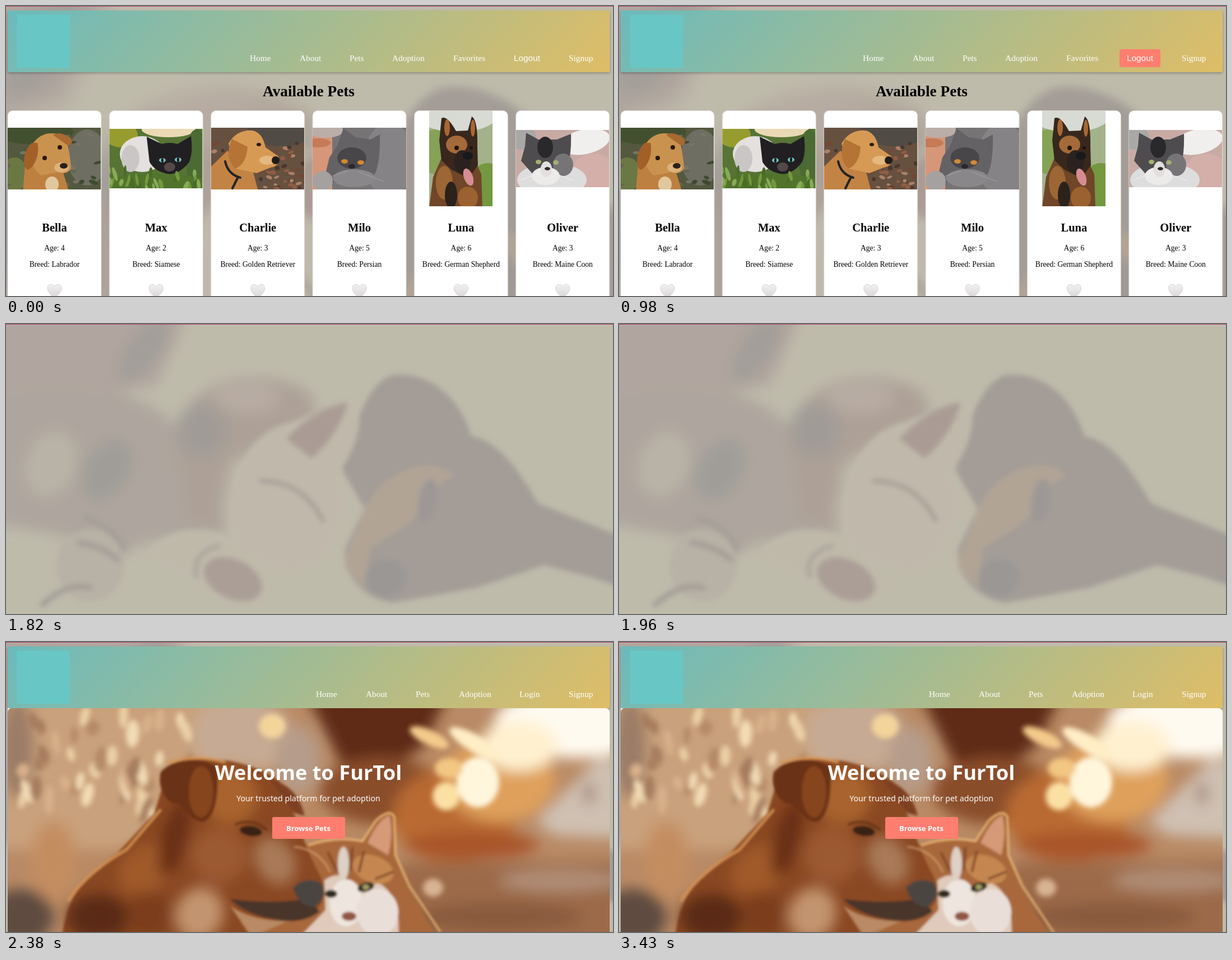
Write an HTML page that moves like this. It is 1083 by 517 pixels and loops after 3.5 s.

```html
<!DOCTYPE html>
<html lang="en">
<head>
<meta charset="utf-8">
<title>Pet adoption</title>
<style>
  html, body { margin: 0; width: 100%; height: 100%; overflow: hidden; background: #bdb8a9; }
  svg { display: block; width: 1083px; height: 517px; }
  text { font-family: "Liberation Serif", Times, serif; white-space: pre; }
  .sans { font-family: "Liberation Sans", Arial, sans-serif; }
  .hero { font-family: "Noto Sans", "Open Sans", sans-serif; fill: #fff; }
  .mid { text-anchor: middle; }
  .bold { font-weight: 700; }
  .nav { font-size: 15.35px; fill: #fff; }
</style>
</head>
<body>
<svg id="stage" viewBox="0 0 1083 517"></svg>
<script>
const LOOP = 3500, STEP = 70;
const HOVER_END = 350, BLANK_AT = 1820, HOME_AT = 2030, LOGO_AT = 2100;
const CORAL = '#ff7e70';

// Markup helpers
const E = (fill, x, y, rx, ry = rx, turn = 0) =>
  `<ellipse cx="${x}" cy="${y}" rx="${rx}" ry="${ry}" fill="${fill}" transform="rotate(${turn} ${x} ${y})"/>`;
const P = (fill, d) => `<path fill="${fill}" d="${d}"/>`;
const L = (color, width, d) => `<path fill="none" stroke="${color}" stroke-width="${width}" stroke-linecap="round" d="${d}"/>`;
const R = (fill, x, y, w, h, r = 0) => `<rect x="${x}" y="${y}" width="${w}" height="${h}" rx="${r}" fill="${fill}"/>`;
const T = (x, y, size, cls, words) => `<text x="${x}" y="${y}" font-size="${size}" class="${cls}">${words}</text>`;
const soft = (blur, body) => `<g filter="url(#b${blur})">${body}</g>`;
const clipped = (id, x, y, w, h, body, r = 0) =>
  `<clipPath id="${id}">${R('#000', x, y, w, h, r)}</clipPath><g clip-path="url(#${id})">${body}</g>`;

let seed = 7;
const rand = (a, b) => {
  seed = (seed * 16807) % 2147483647;
  return a + (b - a) * seed / 2147483647;
};
const scatter = (n, colors, x0, x1, y0, y1, rx, ry) => Array.from({ length: n }, (_, i) =>
  E(colors[i % colors.length], rand(x0, x1), rand(y0, y1), rand(rx / 2, rx), rand(ry / 2, ry), rand(-25, 25))).join('');

// Faded picture of a sleeping kitten and puppy
const backdrop = R('#bfbbab', -20, -20, 1123, 557) + soft(12,
  P('#b1a69f', 'M-30-30H330L270 110 130 130-30 140Z') +
  E('#a39e99', 245, 45, 30, 70, 35) +
  P('#aea69e', 'M-30 125C100 90 250 110 310 190L400 370 250 390 190 420 110 380-30 355Z') +
  E('#b9b2a6', 80, 250, 45, 60, 20) + E('#a09d99', 180, 260, 40, 60, 30) +
  P('#ada197', 'M300 200C320 110 420 70 520 110 570 130 560 180 500 190L400 250 380 370 320 350Z') +
  E('#a19b97', 350, 190, 45, 50) + E('#b7aca3', 430, 130, 60, 28)) + soft(5,
  P('#a39c97', 'M600 260C620 180 650 90 700 90 780 90 820 160 830 200 890 210 930 290 950 320L1100 380V470L1040 450 960 430 840 470 690 497C640 490 600 450 605 400L640 330Z') +
  P('#c0b9ab', 'M400 370C395 260 440 190 510 175L600 140C650 130 630 220 595 260L610 340 560 430C490 460 430 420 400 370Z') +
  P('#aa9c94', 'M500 205C530 170 570 145 610 140 600 180 570 220 545 240Z') +
  L('#a9a098', 9, 'M455 280C500 280 540 300 565 350') +
  P('#b1a495', 'M640 330C670 260 760 230 800 270L750 300C740 360 690 370 650 400L640 470 605 435C608 390 630 370 640 330Z') +
  E('#9b9795', 677, 452, 36, 34) + E('#9d9896', 752, 315, 16, 40, 10) +
  P('#bfb9aa', 'M250 410C290 350 400 350 450 430L465 485 400 495Z') +
  E('#aa9e96', 405, 455, 55, 35, 25) + E('#b8b1a5', 150, 430, 60, 65) +
  L('#a49e98', 10, 'M140 345Q190 360 210 400M130 390Q170 395 200 420M65 500Q110 460 150 470') +
  L('#a8a19a', 7, 'M340 450Q330 410 380 395'));

// Pet portraits: [name, age, breed, x, y, width, height, picture]
const pets = [
  ['Bella', 4, 'Labrador', 3, 217, 166, 110,
    R('#53583f', 0, 210, 175, 120) + E('#6f6e62', 145, 270, 35, 50) + E('#43502f', 50, 225, 70, 22) +
    E('#6c7843', 15, 300, 24, 30) + scatter(26, ['#64664f', '#3f4930', '#787565'], 3, 169, 217, 327, 9, 4) +
    P('#bd8041', 'M30 330L34 285Q60 265 100 290L112 330Z') +
    P('#ca924f', 'M46 248Q62 222 92 228L110 246Q116 278 116 290 108 302 94 296L62 302Q40 284 46 248Z') +
    P('#a26028', 'M46 244C30 258 28 288 39 292 55 284 60 258 56 244Z') +
    P('#a86a30', 'M84 230Q96 222 116 236 121 246 111 249L98 240Z') +
    E('#ddb27a', 99, 288, 13, 9) + E('#2b201c', 103, 285, 7, 5) + E('#2a1810', 69, 271, 4) + E('#2a1810', 96, 252, 4) +
    E('#e1c79d', 82, 318, 12, 14)],
  ['Max', 2, 'Siamese', 184.5, 219, 166, 106,
    R('#577435', 180, 215, 175, 115) + E('#979c2f', 205, 230, 30, 22) + E('#ead9b4', 290, 220, 48, 14) +
    E('#4c6a33', 340, 270, 20, 50) + E('#e4e0dd', 243, 264, 40, 32) + E('#cac6c5', 222, 272, 16, 24) +
    P('#211f22', 'M251 233L278 246Q292 242 306 246L330 232Q334 260 327 278 312 298 292 300 266 296 256 278Z') +
    E('#55484a', 292, 287, 10, 8) + E('#6fc0bd', 279, 275, 6, 4) + E('#6fc0bd', 307, 274, 6, 4) +
    E('#111', 279, 275, 2, 4) + E('#111', 307, 274, 2, 4) + E('#51732b', 267, 316, 95, 17) +
    scatter(28, ['#73993f', '#496c27', '#89aa58'], 184, 350, 292, 325, 4, 13)],
  ['Charlie', 3, 'Golden Retriever', 366, 217, 166, 110,
    R('#66503f', 360, 210, 180, 120) + E('#504b44', 490, 225, 60, 25) +
    scatter(70, ['#925d44', '#49372f', '#ac8169', '#754634'], 366, 532, 245, 327, 6, 4) +
    P('#c38344', 'M362 330V290L395 258 440 292 450 330Z') +
    P('#d69a55', 'M397 245Q412 220 440 222 458 226 463 252L486 268Q490 285 472 288L447 298 410 290Z') +
    P('#b57435', 'M403 237Q389 270 409 290 429 282 431 251Z') +
    E('#e5b97f', 466, 275, 14, 8) + E('#211b1a', 481, 275, 7) + E('#2a1912', 451, 247, 4, 3) +
    L('#222422', 4, 'M391 277Q396 300 418 306M413 307L404 325')],
  ['Milo', 5, 'Persian', 547, 217, 167, 110,
    R('#777476', 540, 210, 180, 120) + R('#d69679', 540, 210, 42, 120) + E('#bbaea8', 570, 222, 32, 13) +
    E('#c67a56', 557, 244, 22, 8) + E('#868386', 684, 274, 45, 66) +
    P('#656265', 'M591 249L602 218 624 234 650 238 667 229Q668 290 654 305 632 326 595 312L565 320 577 270Z') +
    E('#89878a', 621, 307, 38, 16) + E('#49464a', 617, 271, 26, 19) + E('#d28932', 604, 277, 6, 4) +
    E('#d28932', 633, 279, 6, 4) + E('#292529', 617, 286, 6, 4) + L('#a5a1a2', 1, 'M610 294L565 309M628 295L674 313') +
    E('#a6a1a1', 565, 312, 18, 18)],
  ['Luna', 6, 'German Shepherd', 755, 187, 113, 170,
    R('#a4b28b', 750, 180, 125, 180) + E('#d7dbd4', 805, 190, 75, 35) + E('#73983f', 860, 335, 40, 55) + E('#85a257', 765, 260, 25, 40) +
    P('#704528', 'M755 360L762 305 782 260 830 260 848 300 850 360Z') +
    P('#38271d', 'M773 240L777 200Q787 194 803 223L824 222 831 197Q842 203 841 251L842 284 825 307 795 292 777 275Z') +
    E('#a86732', 787, 217, 5, 15) + E('#a86732', 833, 218, 4, 15) + E('#a46a39', 804, 247, 19, 16) +
    E('#2b211e', 814, 278, 15, 21) + E('#17191b', 824, 267, 9, 7) + E('#20130d', 804, 253, 4) + E('#20130d', 830, 253, 3) +
    E('#d58d92', 825, 305, 8, 16, -20) + E('#9c6735', 782, 315, 15, 30) + E('#2b221c', 794, 337, 11, 24) + E('#9b6130', 824, 342, 18, 20)],
  ['Oliver', 3, 'Maine Coon', 910, 221, 166, 102,
    R('#c8aaa5', 900, 215, 180, 120) + E('#f1eeee', 1033, 242, 45, 22, -12) + E('#aaa8a7', 918, 234, 28, 22) +
    E('#d4aea9', 1048, 300, 40, 37) + E('#dedddd', 974, 310, 62, 30) +
    P('#4e4c4e', 'M926 250L928 226 950 238 983 238 1008 228Q1009 265 1002 285L975 301 941 301 919 276Z') +
    E('#777477', 994, 283, 18, 20) + E('#29282b', 962, 252, 14, 19) + E('#edeaea', 963, 303, 25, 16) + E('#e3dfde', 964, 291, 10, 14) +
    E('#a6ae73', 950, 278, 5, 4) + E('#a6ae73', 981, 279, 5, 4) + E('#332a2c', 966, 290, 5, 3) + L('#f4f2f1', 1, 'M953 297L919 310M976 297L1012 311')],
];

const card = ([name, age, breed, x, y, w, h, picture], i) => {
  const left = 3 + i * 181.35, mid = left + 83.5;
  return `<rect x="${left}" y="186.5" width="167" height="350" rx="9" fill="#fff" stroke="#d5d1cd"/>` +
    clipped('pet' + i, x, y, w, h, soft(1, picture)) +
    T(mid, 401.5, 20.5, 'mid bold', name) + T(mid, 436, 13.6, 'mid', 'Age: ' + age) + T(mid, 465.3, 13.6, 'mid', 'Breed: ' + breed) +
    `<path transform="translate(${mid} 496)" fill="url(#heart)" stroke="#cfcdcf" stroke-width=".8" d="M0 4C-4-2-13-1-12.5 8-12 15-5 20 0 25 5 20 12 15 12.5 8 13-1 4-2 0 4Z"/>`;
};

// Evening light behind the dog and the cat
const evening = R('#b98a65', -20, 100, 1123, 440) + soft(12,
  R('#c9a17c', -20, 100, 400, 270) + E('#9b7b66', 20, 190, 30, 90) + E('#c48d60', 85, 390, 40, 70) + E('#5f4b40', 25, 490, 60, 50) +
  E('#c7aa93', 420, 165, 90, 70) + E('#b69c8a', 520, 210, 40, 60) +
  P('#5f2a12', 'M535 90H790L745 185 680 230 620 260Z') + E('#8a4d2a', 670, 265, 110, 60) +
  E('#b96a32', 800, 310, 110, 85) + E('#dfa05c', 880, 245, 100, 75) + E('#fffaf0', 1020, 145, 150, 62) + E('#fff1d0', 915, 185, 70, 45) +
  E('#a9552c', 830, 362, 120, 24) + R('#9c6a49', 700, 392, 400, 150) + E('#b08d76', 990, 425, 110, 20) + E('#895a3e', 880, 490, 150, 25) +
  P('#cfc0b2', 'M945 320L1060 205 1100 220V350L980 345Z') + E('#a78c7d', 1040, 270, 11, 20)) + soft(5,
  scatter(44, ['#ecd0a6', '#d8b08a', '#a67d5e', '#f2dbb5', '#b58a66'], 20, 330, 130, 310, 12, 26) +
  E('#f3d49b', 475, 150, 24, 22) + E('#fff6dc', 842, 250, 38, 45) + E('#fbe0a4', 785, 275, 24, 25) + E('#f4cb8b', 755, 170, 38, 13, 25) +
  E('#ffeec6', 835, 180, 50, 15, 30) + E('#f2c683', 790, 225, 25, 18) + E('#d8b393', 762, 438, 18, 16));

const cat =
  P('#a9683a', 'M530 362Q590 345 636 355L660 318Q685 295 693 312L695 380 716 435 770 530H430L520 490Z') +
  P('#d69a78', 'M645 358Q664 316 684 309 692 340 682 380Z') +
  P('#e0cabb', 'M568 425Q600 402 618 438L665 430Q705 450 700 530H520L570 478Z') +
  E('#eee5de', 607, 465, 30, 42) + E('#eadfd8', 663, 482, 37, 42) + E('#c5874f', 655, 405, 38, 24, 20) + E('#ddd0c5', 602, 395, 10, 30) +
  E('#33291e', 580, 449, 11, 7) + E('#33291e', 642, 437, 15, 8, -15) + E('#9e9b62', 642, 437, 6, 5) + E('#925744', 612, 489, 13, 8) +
  L('#7c4525', 4, 'M575 376L590 408M618 367L615 405M638 374L630 409M690 410L660 422') +
  L('#efbd78', 3, 'M540 362Q590 345 636 355L660 318Q685 295 693 312L695 380 720 435 775 517');

const dog =
  P('#8a4823', 'M100 530C105 460 135 420 200 375L265 305 290 220C340 195 440 210 490 250 515 300 530 360 560 415 580 455 560 485 520 497 460 500 420 485 400 470L440 530Z') +
  soft(12, E('#a9642f', 400, 275, 50, 50) + E('#9c5a30', 380, 380, 50, 50) + E('#a05a2b', 250, 405, 55, 40, -35) + E('#c39470', 345, 485, 42, 48, 20) +
    E('#672f13', 300, 350, 22, 70, 15) + E('#a97a58', 480, 390, 34, 45, -30) + E('#5a2a14', 165, 490, 55, 40) + E('#7b3d1c', 255, 485, 40, 40)) +
  L('#d99452', 4, 'M112 460Q145 410 215 370L275 300M290 215Q340 200 390 214') +
  P('#6a3018', 'M276 232C300 205 350 205 375 222 382 260 375 318 350 321 325 317 315 285 300 288 279 280 271 254 276 232Z') +
  E('#86441f', 348, 267, 22, 46) + P('#7e4020', 'M470 245Q520 255 533 310L515 305Z') +
  P('#4a342a', 'M400 458Q470 468 535 458L560 480Q530 504 485 495 430 488 400 458Z') +
  P('#4c4542', 'M512 438Q535 416 562 430 577 452 551 472 523 474 512 438Z') +
  E('#392016', 437, 337, 20, 9, 8) + L('#623015', 4, 'M410 325Q440 313 465 335') + L('#e4b37d', 1.5, 'M515 365Q560 370 578 410');

const scene = evening + soft(2, cat + dog);

const nav = items => items.map(([x, word, cls = '']) => T(x, 98, 15.35, 'nav ' + cls, word)).join('');
const blur = n => `<filter id="b${n}" x="-20%" y="-20%" width="140%" height="140%"><feGaussianBlur stdDeviation="${n === 1 ? .7 : n}"/></filter>`;

const stage = document.getElementById('stage');
stage.innerHTML = `<defs>${[1, 2, 5, 12].map(blur).join('')}
  <linearGradient id="bar" gradientUnits="userSpaceOnUse" x1="244" y1="-233" x2="836" y2="359">
    <stop stop-color="#6bbabc"/><stop offset="1" stop-color="#dfbd66"/></linearGradient>
  <linearGradient id="heart" x2="0" y2="1"><stop stop-color="#f2f0f1"/><stop offset="1" stop-color="#d8d5d7"/></linearGradient></defs>
  <g id="backdrop">${backdrop}</g>
  <g id="header">${soft(2, R('#0004', 3, 11, 1074, 109))}${R('url(#bar)', 3, 8, 1074, 110)}</g>
  <g id="pets">
    <rect id="hover" x="893" y="77" width="73" height="32" rx="4" fill="${CORAL}"/>
    ${nav([[435, 'Home'], [524, 'About'], [613, 'Pets'], [689, 'Adoption'], [798, 'Favorites'], [906, 'Logout', 'sans'], [1004, 'Signup']])}
    ${T(540, 161, 27.3, 'mid bold', 'Available Pets')}${pets.map(card).join('')}
  </g>
  <g id="home">
    ${nav([[553, 'Home'], [642, 'About'], [731, 'Pets'], [808, 'Adoption'], [916, 'Login'], [1004, 'Signup']])}
    ${R('#fff', 3, 118, 20, 20)}${clipped('view', 3, 118, 1074, 420, scene, 7)}
    ${T(539.5, 246, 36.2, 'hero mid bold', 'Welcome to FurTol')}
    ${T(539.5, 283.5, 14.2, 'hero mid', 'Your trusted platform for pet adoption')}
    ${R(CORAL, 475, 312, 130, 39, 3)}${T(539.5, 336.5, 13, 'hero mid bold', 'Browse Pets')}
  </g>
  <g id="logo">${R('#68c7c5', 19.5, 15.5, 94.5, 94.5)}</g>
  ${R('#b5476a', 0, 0, 1083, 1)}`;

const part = id => document.getElementById(id);
const show = (id, on) => part(id).setAttribute('visibility', on ? 'visible' : 'hidden');
const easeOut = p => 1 - (1 - p) ** 2;

function draw(now) {
  const t = Math.floor(now % LOOP / STEP) * STEP;
  const onPets = t < BLANK_AT, onHome = t >= HOME_AT;
  show('pets', onPets);
  show('home', onHome);
  show('header', onPets || onHome);
  show('logo', onPets || t >= LOGO_AT);
  part('hover').setAttribute('opacity', easeOut(Math.min(1, t / HOVER_END)));
  part('backdrop').setAttribute('transform', onPets ? 'translate(-325 0) scale(1.6)' : '');
}

const start = performance.now();
function tick() {
  draw(performance.now() - start);
  requestAnimationFrame(tick);
}
tick();
</script>
</body>
</html>
```
